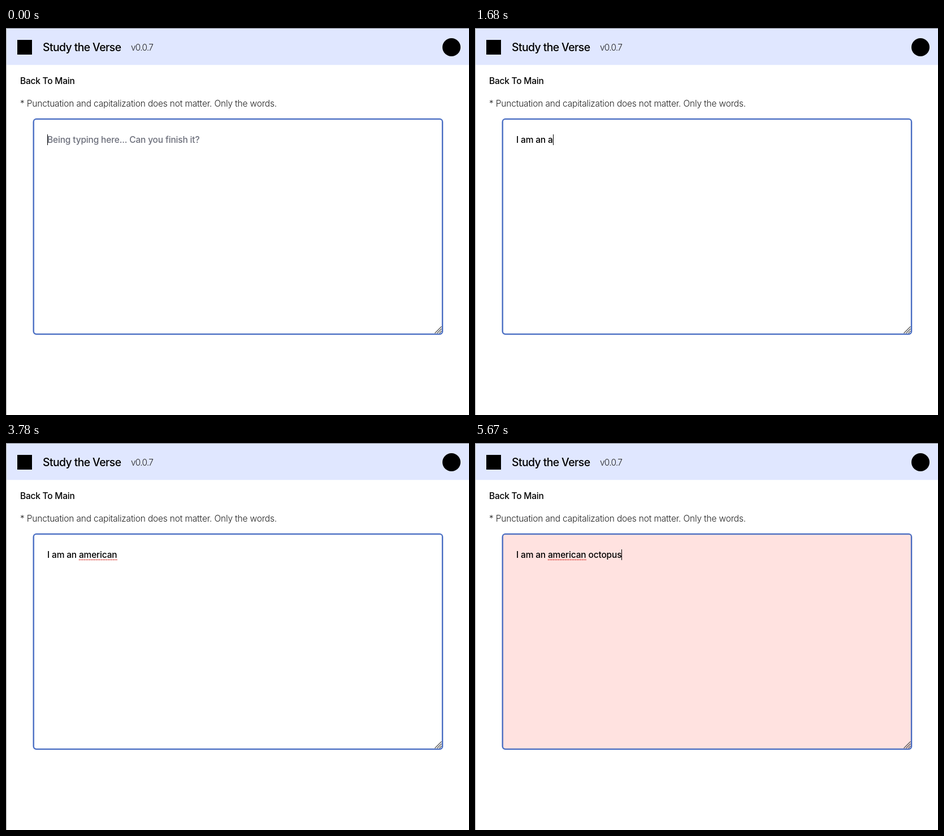
Recreate the animation shown at these times as an HTML page with a canvas. Size 819x684 px, loop 5.95 s.

```html
<!DOCTYPE html>
<html lang="en">
<head>
<meta charset="utf-8">
<title>Typing practice</title>
<style>
  html, body { margin: 0; width: 100%; height: 100%; overflow: hidden; background: #fff; }
  canvas { display: block; }
</style>
</head>
<body>
<canvas id="stage" width="819" height="684"></canvas>
<script>
const ctx = document.getElementById('stage').getContext('2d');

const LOOP = 5950;
const TYPED = 'I am an american octopus';
const WORD_START = 8, WORD_END = 16;
const LEFT = 73, BASELINE = 203;

// The first stroke enters "I " at once; every later one adds a character.
const keyTimes = [
  630, 980, 1050, 1120, 1330, 1400, 1540, 1680, 2030, 2730, 2800, 2870,
  3010, 3150, 3290, 3360, 4060, 4200, 4900, 4970, 5110, 5320, 5670
];
const caretOffTimes = [770, 1190, 1820, 2380, 3570, 4620];

const styles = {
  title: { size: 19.4, weight: 500, spacing: -0.6 },
  link: { size: 15.5, weight: 500, spacing: -0.23 },
  light: { size: 15.5, weight: 300, spacing: -0.18 },
  version: { size: 15.5, weight: 300, spacing: -0.75 },
  input: { size: 15.5, weight: 450, spacing: -0.17 }
};

function useStyle({ size, weight, spacing }) {
  ctx.font = `${weight} ${size}px Inter, sans-serif`;
  ctx.letterSpacing = `${spacing}px`;
}

function text(str, x, y, style, color = '#000') {
  useStyle(style);
  ctx.fillStyle = color;
  ctx.fillText(str, x, y);
}

function rect(x, y, w, h, color) {
  ctx.fillStyle = color;
  ctx.fillRect(x, y, w, h);
}

function line(x1, y1, x2, y2, color, width) {
  ctx.strokeStyle = color;
  ctx.lineWidth = width;
  ctx.beginPath();
  ctx.moveTo(x1, y1);
  ctx.lineTo(x2, y2);
  ctx.stroke();
}

function inputX(count) {
  useStyle(styles.input);
  return LEFT + ctx.measureText(TYPED.slice(0, count)).width;
}

function drawPage() {
  rect(0, 0, 819, 684, '#fff');
  rect(0, 0, 819, 65.3, '#e0e7ff');
  rect(0, 0, 819, 1, '#76787f');
  rect(0, 0, 1, 684, '#a8a8a8');

  rect(20, 21, 26, 26, '#000');
  ctx.beginPath();
  ctx.arc(788, 34, 16, 0, Math.PI * 2);
  ctx.fill();

  text('Study the Verse', 65, 41, styles.title);
  text('v0.0.7', 221, 40, styles.version, '#222');
  text('Back To Main', 25, 99, styles.link);
  text('* Punctuation and capitalization does not matter. Only the words.',
    25, 139, styles.light, '#222');
}

function drawBox(wrong) {
  ctx.beginPath();
  ctx.roundRect(48.7, 160.9, 723.4, 380.2, 5);
  ctx.fillStyle = wrong ? '#ffe2e0' : '#fff';
  ctx.fill();
  // A faint wide stroke softens the edge of the border.
  ctx.strokeStyle = 'rgba(56, 96, 189, 0.25)';
  ctx.lineWidth = 3.4;
  ctx.stroke();
  ctx.strokeStyle = '#3860bd';
  ctx.lineWidth = 1.8;
  ctx.stroke();

  for (const length of [12, 8, 4]) {
    line(770.5 - length, 539.5, 770.5, 539.5 - length, '#555', 1.2);
  }
}

function drawUnderline() {
  ctx.setLineDash([1.7, 1.3]);
  line(inputX(WORD_START), 206.3, inputX(WORD_END), 206.3, '#d6332c', 1.8);
  ctx.setLineDash([]);
}

function draw(time) {
  const strokes = keyTimes.filter(t => t <= time).length;
  const count = strokes ? strokes + 1 : 0;
  const lastKey = strokes ? keyTimes[strokes - 1] : 0;
  const caretOn = !caretOffTimes.some(t => t > lastKey && t <= time);

  drawPage();
  drawBox(count > WORD_END + 1);
  if (count) {
    text(TYPED.slice(0, count), LEFT, BASELINE, styles.input);
  } else {
    text('Being typing here... Can you finish it?', LEFT, BASELINE, styles.input, '#6b6e7a');
  }
  if (count > WORD_END) drawUnderline();
  if (caretOn) rect(Math.round(inputX(count)), 188, 1, 19, '#000');
}

function tick() {
  draw(performance.now() % LOOP);
  requestAnimationFrame(tick);
}
tick();
</script>
</body>
</html>
```
